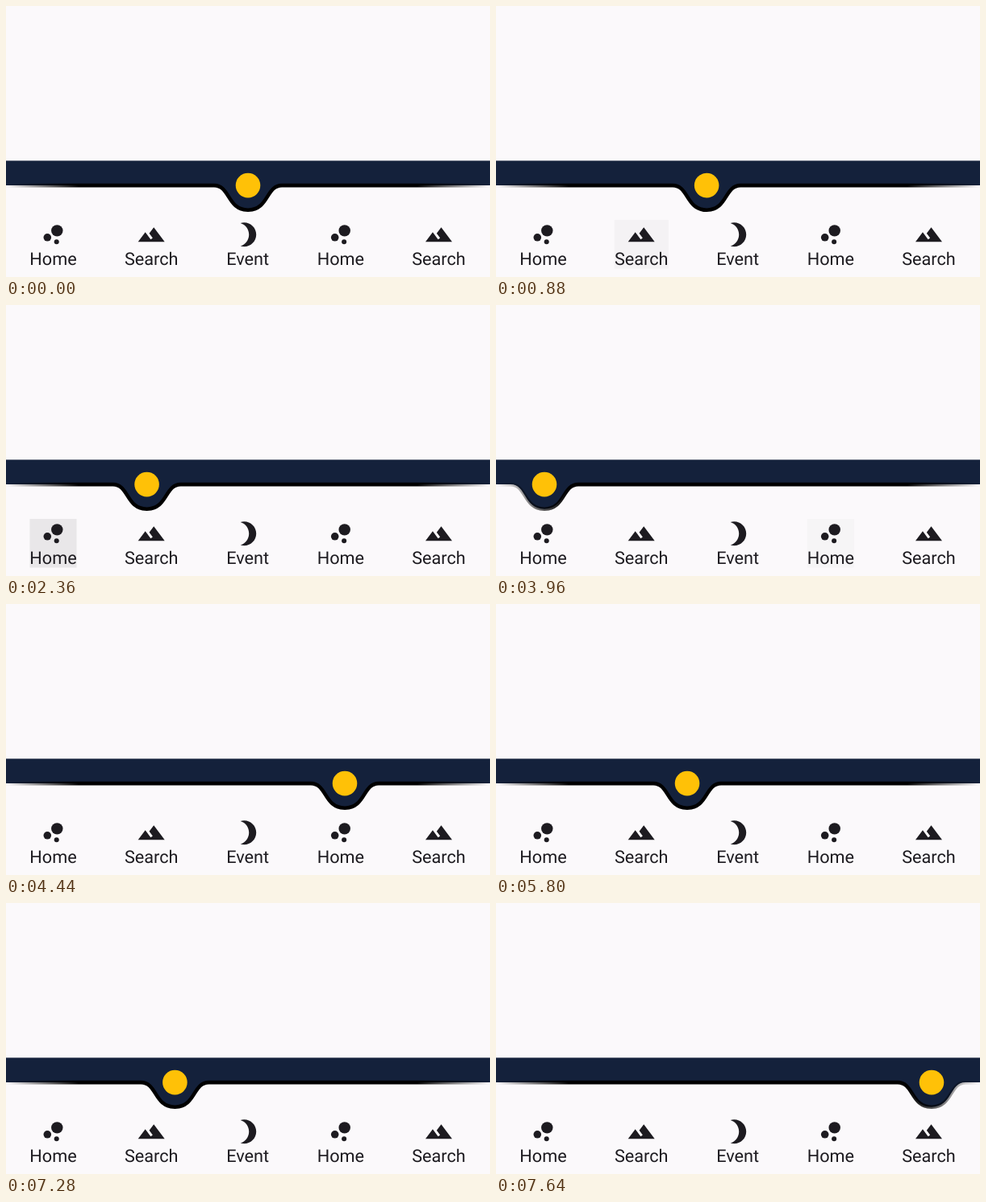
Animation of 600 by 337 pixels, one loop 8000 ms. Source, as an HTML page:

```html
<!DOCTYPE html>
<html lang="en">
<head>
<meta charset="utf-8">
<title>Navigation bar</title>
<style>
  html, body { margin: 0; width: 600px; height: 337px; overflow: hidden; background: #fbf9fb; }
  svg { display: block; }
  text { font: 21.7px Roboto, sans-serif; text-anchor: middle; text-rendering: geometricPrecision; }
</style>
</head>
<body>
<svg width="600" height="337">
  <defs>
    <linearGradient id="fade" gradientUnits="userSpaceOnUse" x1="0" y1="0" x2="600" y2="0">
      <stop offset="0" stop-opacity="0"/>
      <stop offset=".15"/>
      <stop offset=".85"/>
      <stop offset="1" stop-opacity="0"/>
    </linearGradient>
  </defs>
  <rect y="192.4" width="600" height="30.6" fill="#14213b"/>
  <path id="wave" fill="#14213b" stroke="url(#fade)" stroke-width="4.6"/>
  <circle id="ball" cy="223.1" r="15.3" fill="#ffc107"/>
  <g id="items" fill="#1d1b20"></g>
</svg>
<script>
const LOOP = 8000, STEP = 120, MOVE = 400, FADE = 200;

const icons = {
  Home: '<circle cx="7.2" cy="14.4" r="3.2"/><circle cx="14.8" cy="18" r="2"/><circle cx="15.2" cy="8.8" r="4.8"/>',
  Search: '<path d="M14 6l-3.75 5 2.85 3.8-1.6 1.2C9.81 13.75 7 10 7 10l-6 8h22z"/>',
  Event: '<path d="M9 2c-1.05 0-2.05.16-3 .46 4.06 1.27 7 5.06 7 9.54s-2.94 8.27-7 9.54c.95.3 1.95.46 3 .46 5.52 0 10-4.48 10-10S14.52 2 9 2z"/>'
};

const items = [
  { name: 'Home', x: 58.5, width: 58 },
  { name: 'Search', x: 180.2, width: 67 },
  { name: 'Event', x: 299.7, width: 54 },
  { name: 'Home', x: 414.9, width: 58 },
  { name: 'Search', x: 536.5, width: 67 }
];

// start: first visible change; down: press begins; go: ball sets off
const taps = [
  { start: 520, down: 480, go: 722, to: 1, pressed: true },
  { start: 2240, down: 2130, go: 2300, to: 0, pressed: true },
  { start: 3960, down: 3920, go: 4000, to: 3, pressed: true },
  { start: 5560, go: 5535, to: 1 },
  { start: 7280, go: 7200, to: 4 }
];

const wave = document.getElementById('wave');
const ball = document.getElementById('ball');
const group = document.getElementById('items');

group.innerHTML = items.map(({ name, x, width }) => `
  <rect x="${x - width / 2}" y="266" width="${width}" height="60.6" fill="#bcbcbc"/>
  <g transform="translate(${x - 18} 266.2) scale(1.5)">${icons[name]}</g>
  <text x="${x}" y="322.3">${name}</text>`).join('');
const highlights = group.querySelectorAll('rect');

const clamp = v => Math.max(0, Math.min(1, v));
const centre = index => 60 + 120 * index;

// cubic-bezier(.42, 0, .58, 1)
function easeInOut(x) {
  if (x <= 0 || x >= 1) return clamp(x);
  let low = 0, high = 1, s;
  for (let i = 0; i < 20; i++) {
    s = (low + high) / 2;
    const at = 1.26 * s * (1 - s) ** 2 + 1.74 * s * s * (1 - s) + s ** 3;
    if (at < x) low = s; else high = s;
  }
  return s * s * (3 - 2 * s);
}

function pressLevel(tap, t) {
  const up = tap.go + 20;
  const level = clamp((Math.min(t, up) - tap.down) / FADE);
  return clamp(level - Math.max(0, t - up) / FADE);
}

function draw(time) {
  let x = centre(2);
  const press = items.map(() => 0);
  for (const tap of taps) {
    if (time < tap.start) break;
    const t = tap.start + Math.floor((time - tap.start) / STEP) * STEP;
    x += (centre(tap.to) - x) * easeInOut((t - tap.go) / MOVE);
    if (tap.pressed) press[tap.to] = pressLevel(tap, t);
  }
  ball.setAttribute('cx', x);
  wave.setAttribute('d', `M-5 223.1H${x - 42}C${x - 22} 223.1 ${x - 26} 253.7 ${x} 253.7` +
    `S${x + 22} 223.1 ${x + 42} 223.1H605`);
  highlights.forEach((box, i) => box.setAttribute('opacity', 0.4 * press[i]));
}

function frame() {
  draw(performance.now() % LOOP);
  requestAnimationFrame(frame);
}
frame();
</script>
</body>
</html>
```
